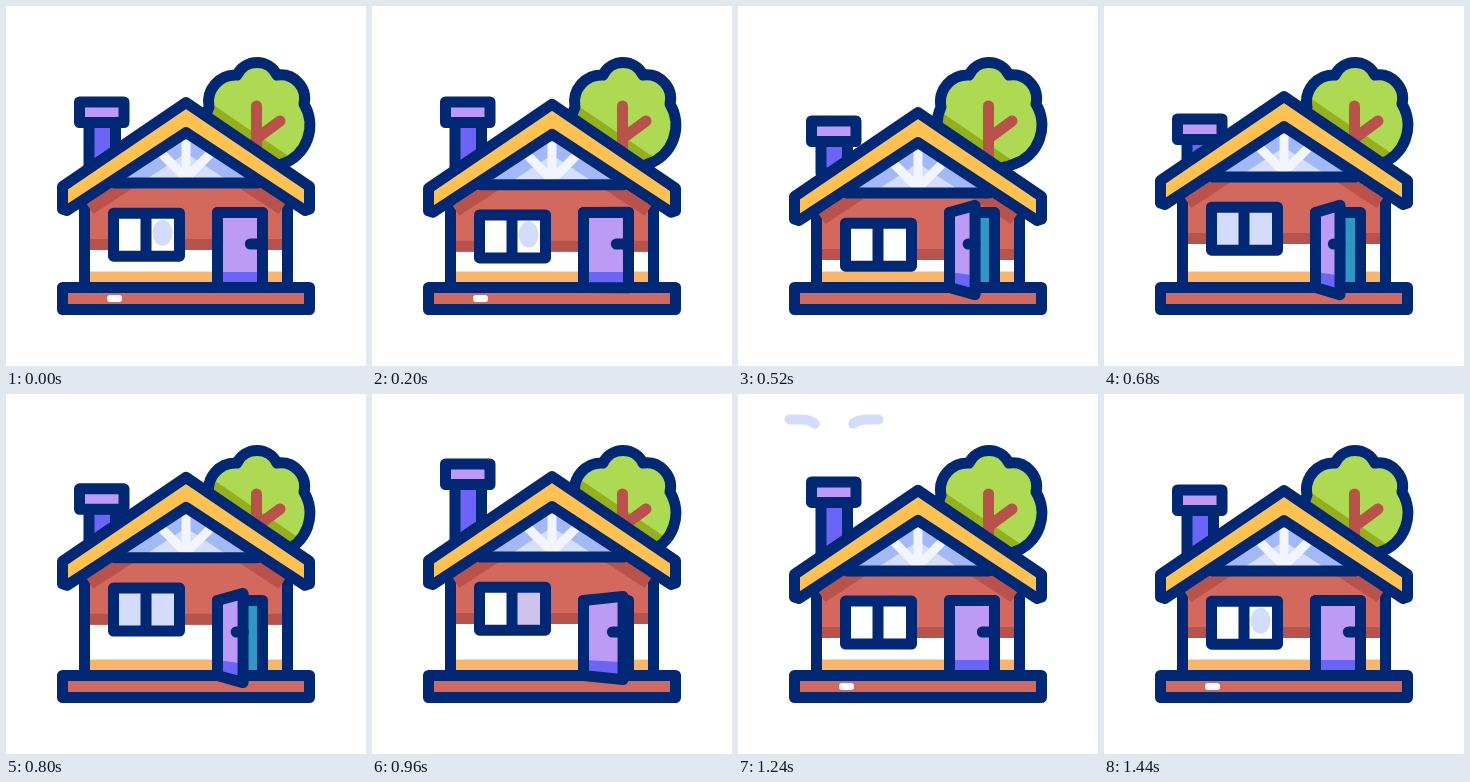
An HTML page for the animation above (1560 ms loop, 360 px wide and 360 px high).

```html
<!DOCTYPE html>
<html lang="en">
<head>
<meta charset="utf-8">
<title>Little house</title>
<style>
  html, body { margin: 0; width: 100%; height: 100%; overflow: hidden; background: #fff; }
  svg { display: block; width: 100vw; height: 100vh; }
  .ink { stroke: #002875; stroke-width: 11; stroke-linejoin: round; stroke-linecap: round; }
  .line { fill: none; }
</style>
</head>
<body>
<svg viewBox="0 0 360 360">
  <defs>
    <path id="crown" d="M231 69A22.2 22.2 0 0 1 271 69A24 24 0 0 1 298 98A41 41 0 0 1 276 158A60 60 0 0 1 215 150A40 40 0 0 1 203 101A27 27 0 0 1 231 69Z"/>
    <path id="pane" d="M180 126L103 177H257Z"/>
    <path id="eave" d="M84 203L180 140L276 203" fill="none" stroke-width="12"/>
    <clipPath id="inCrown"><use href="#crown"/></clipPath>
    <clipPath id="inPane"><use href="#pane"/></clipPath>
  </defs>

  <g id="tree">
    <use href="#crown" fill="#aed952"/>
    <g clip-path="url(#inCrown)">
      <path id="treeShade" d="M180 80.3L310 168.7V260H180Z" fill="#95b01c"/>
    </g>
    <path d="M250.5 100V160M251 132L274 115" fill="none" stroke="#b9524a" stroke-width="11" stroke-linecap="round"/>
    <use href="#crown" class="ink line"/>
  </g>

  <g fill="none" stroke="#d3dcfb" stroke-width="10" stroke-linecap="round">
    <path class="smoke" d="M83 78V45C83 33 76 25.5 63 25.5H49"/>
    <path class="smoke" d="M109 78V45C109 33 116 25.5 129 25.5H143"/>
  </g>

  <path id="stack" class="ink" fill="#6c63f7"/>
  <rect id="cap" class="ink" x="73.5" y="96" width="44.5" height="20.5" fill="#bd9af5"/>

  <rect x="79" y="215" width="202" height="66" fill="#fff"/>
  <rect x="79" y="265.5" width="202" height="16" fill="#f9b66b"/>
  <path id="posts" class="ink line"/>

  <g id="house">
    <path d="M84 190L180 126L276 190V244H84Z" fill="#d3695c"/>
    <path d="M84 233H276V244H84Z" fill="#b9524a"/>
    <use href="#eave" stroke="#b9524a"/>
    <use href="#pane" fill="#d5defb"/>
    <g clip-path="url(#inPane)">
      <use href="#eave" stroke="#a3b9f5"/>
      <g stroke="#f3f5fe" fill="#f3f5fe">
        <path d="M180 172V134M180 172L156 148M180 172L204 148" stroke-width="9"/>
        <circle cx="180" cy="172" r="6"/>
      </g>
    </g>
    <path class="ink" d="M109 177H251"/>
    <path class="ink" fill="#ffc251" d="M180 96.5L303.5 180.5V203L299 204.5L180 126.5L61 204.5L56.5 203V180.5Z"/>
    <g transform="translate(0 .7)">
      <rect x="108" y="207" width="65" height="43" fill="#fff"/>
      <rect id="glassL" x="112" y="211" width="23" height="34" fill="#d3dcfb"/>
      <rect id="glassR" x="144" y="211" width="25" height="34"/>
      <ellipse id="glint" cx="156.5" cy="226" rx="10" ry="13" fill="#d3dcfb"/>
      <path class="ink line" d="M107.5 206.5H173.5V249.5H107.5ZM140 206.5V249.5"/>
    </g>
  </g>

  <rect class="ink" x="56.5" y="281.5" width="247" height="22" fill="#d3695c"/>
  <rect id="shine" x="101" y="289" width="15" height="7" rx="3" fill="#fff"/>

  <rect class="ink" x="211.5" y="206.5" width="45" height="75" fill="#2f96c6"/>
  <path id="door" fill="#bd9af5"/>
  <path id="kick" fill="#6c63f7"/>
  <path id="doorLine" class="ink line"/>
  <path id="knob" class="ink line"/>
</svg>

<script>
const LOOP = 1560, STEP = 40;
const $ = id => document.getElementById(id);
const set = (id, name, value) => $(id).setAttribute(name, value);
const show = (id, on) => set(id, 'visibility', on ? 'visible' : 'hidden');
const smokes = document.querySelectorAll('.smoke');
const smokeLen = smokes[0].getTotalLength();

// [time, offset] pairs
const roofKeys = [[120, 0], [360, 9], [440, 10.5], [520, 10], [680, -6], [880, -15], [960, -14], [1120, -3.6], [1260, 0]];
const stackKeys = [[240, 0], [360, 3], [520, 19], [600, 20.5], [680, 17], [960, -26], [1020, -27.5], [1120, -21], [1360, 0]];
const headKeys = [[980, 0], [1120, 64], [1200, 74], [1240, 76]];
const tailKeys = [[1060, 0], [1120, 19], [1240, 50], [1400, 77]];

function slope(keys, i) {
  const a = keys[i - 1], b = keys[i], c = keys[i + 1];
  if (!a || !c || (b[1] - a[1]) * (c[1] - b[1]) <= 0) return 0;
  return (c[1] - a[1]) / (c[0] - a[0]);
}

// Smooth curve through the keys, flat at peaks and ends
function curve(keys, t) {
  const last = keys.length - 1;
  if (t <= keys[0][0]) return keys[0][1];
  if (t >= keys[last][0]) return keys[last][1];
  const i = keys.findIndex(k => k[0] > t) - 1;
  const [t0, a] = keys[i], [t1, b] = keys[i + 1];
  const d = t1 - t0, u = (t - t0) / d, v = 1 - u;
  return a * v * v * (1 + 2 * u) + b * u * u * (3 - 2 * u)
    + d * u * v * (v * slope(keys, i) - u * slope(keys, i + 1));
}

function ease(t, from, to) {
  const u = Math.min(1, Math.max(0, (t - from) / (to - from)));
  return u * u * (3 - 2 * u);
}

function drawDoor(t) {
  const angle = (ease(t, 160, 560) - ease(t, 760, 1160)) * 57 * Math.PI / 180;
  const left = 211.5, w = 45 * Math.cos(angle), rise = 8.6 * Math.sin(angle);
  const right = left + w, low = 281.5 + rise;
  const panel = `M${left} 206.5L${right} ${206.5 - rise}V${low}L${left} 281.5Z`;
  set('door', 'd', panel);
  set('doorLine', 'd', panel);
  set('kick', 'd', `M${left} 266L${right} ${266 + rise * 0.5}V${low}L${left} 281.5Z`);
  set('knob', 'd', `M${left + w * 0.73} 238H${right}`);
}

function drawSmoke(t) {
  const head = Math.min(curve(headKeys, t), smokeLen), tail = curve(tailKeys, t);
  for (const s of smokes) {
    s.style.visibility = head > tail ? 'visible' : 'hidden';
    s.setAttribute('stroke-dasharray', `${Math.max(0, head - tail)} 300`);
    s.setAttribute('stroke-dashoffset', -tail);
  }
}

function drawGlass(t) {
  const tinted = t >= 640 && t < 840;
  show('glassL', tinted);
  show('glassR', tinted || (t >= 840 && t < 1040));
  set('glassR', 'fill', tinted ? '#d3dcfb' : '#cfc3ee');
  show('glint', t < 240 || t >= 1280);
  show('shine', t < 480 || t >= 1240);
}

function render(t) {
  const roof = curve(roofKeys, t), stack = curve(stackKeys, t);
  set('house', 'transform', `translate(0 ${roof})`);
  set('treeShade', 'transform', `translate(0 ${roof})`);
  set('posts', 'd', `M78.5 ${195 + roof}V281M281.5 ${195 + roof}V281`);
  set('cap', 'transform', `translate(0 ${stack})`);
  set('stack', 'd', `M83 ${116 + stack}H109.5V167H83Z`);
  drawDoor(t);
  drawSmoke(t);
  drawGlass(t);
}

const start = performance.now();
function tick() {
  const t = (performance.now() - start) % LOOP;
  render(Math.floor(t / STEP) * STEP);
  requestAnimationFrame(tick);
}
tick();
</script>
</body>
</html>
```
